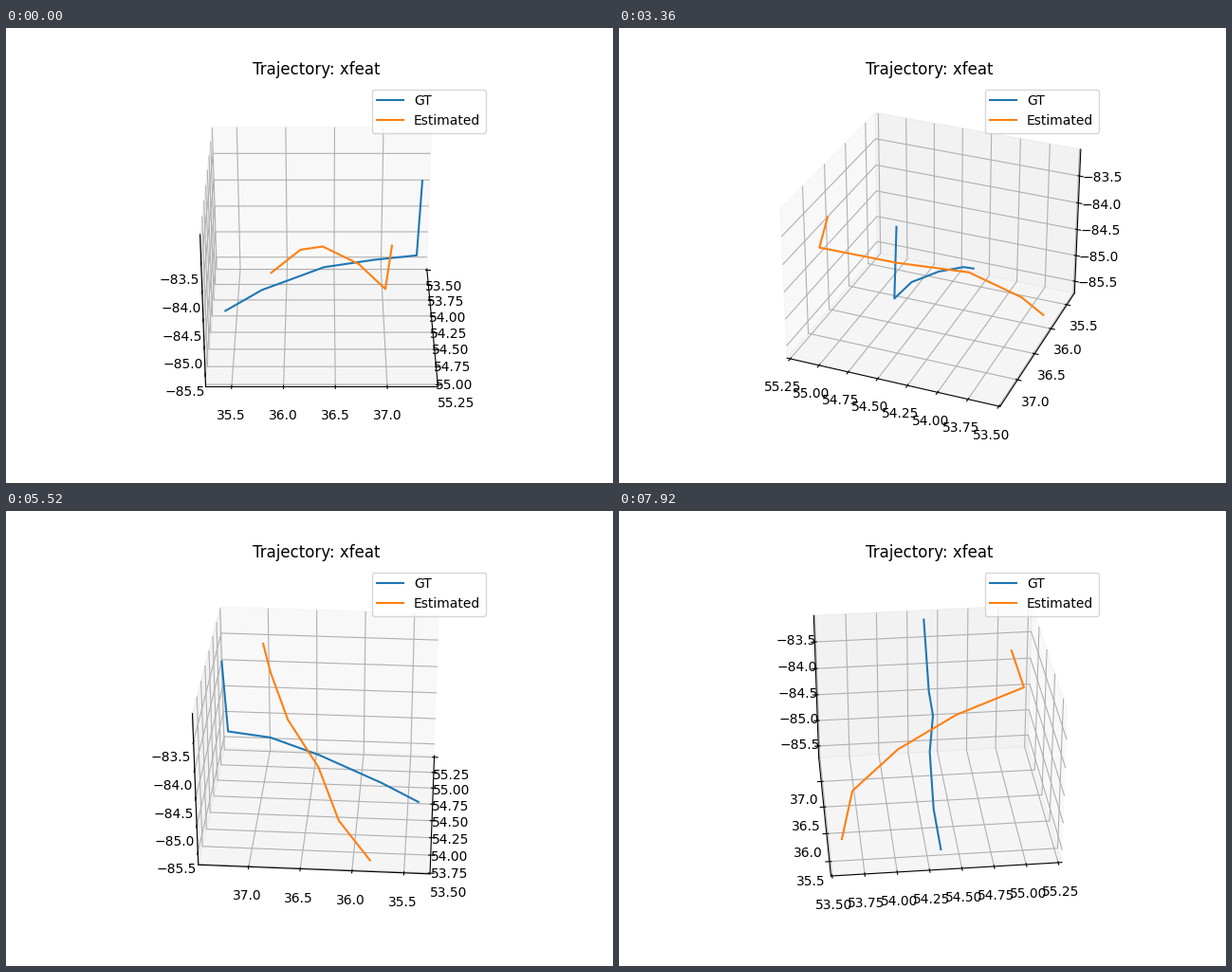
A matplotlib script that plays this animation: 640 by 480 pixels, repeating every 8 s.

```python
import numpy as np
import matplotlib.pyplot as plt
from matplotlib.animation import FuncAnimation
from matplotlib.ticker import MultipleLocator

TICK_MS = 40        # 200 ticks make one 8 s loop
TICKS = 200
TICKS_PER_STEP = 3  # the camera turns every 120 ms
STEP_DEG = 4
ELEV = 30


def ground_truth():
    """A nearly straight climb that levels off, then a jump upwards."""
    x = np.array([54.349, 54.324, 54.345, 54.412, 54.413, 54.376])
    y = np.array([35.392, 35.766, 36.391, 36.885, 37.310, 37.347])
    u = y - 36.37
    z = -84.694 + 0.578 * u - 0.26 * u**2
    z[-1] = -83.066
    return x, y, z


def estimate():
    """A winding climb given by its corner points."""
    corners = [
        (53.604, 35.833, -85.677),
        (53.710, 36.146, -85.097),
        (54.090, 36.379, -84.592),
        (54.589, 36.729, -84.329),
        (55.164, 36.969, -84.094),
        (55.062, 37.028, -83.448),
    ]
    return zip(*corners)


fig = plt.figure(figsize=(6.4, 4.8), dpi=100)
ax = fig.add_subplot(projection="3d")
for label, path in (("GT", ground_truth()), ("Estimated", estimate())):
    ax.plot(*path, label=label)
ax.set_title("Trajectory: xfeat", x=0.4975)
ax.legend(loc="upper right")

ax.margins(0.05, 0.05, 0)
for axis, step in ((ax.xaxis, 0.25), (ax.yaxis, 0.5), (ax.zaxis, 0.5)):
    axis.set_major_locator(MultipleLocator(step))


def update(tick):
    ax.view_init(elev=ELEV, azim=STEP_DEG * (tick // TICKS_PER_STEP))
    return ax.lines


anim = FuncAnimation(fig, update, frames=TICKS, interval=TICK_MS,
                     init_func=lambda: update(0), repeat=True,
                     repeat_delay=0, blit=False)
plt.show()
```
